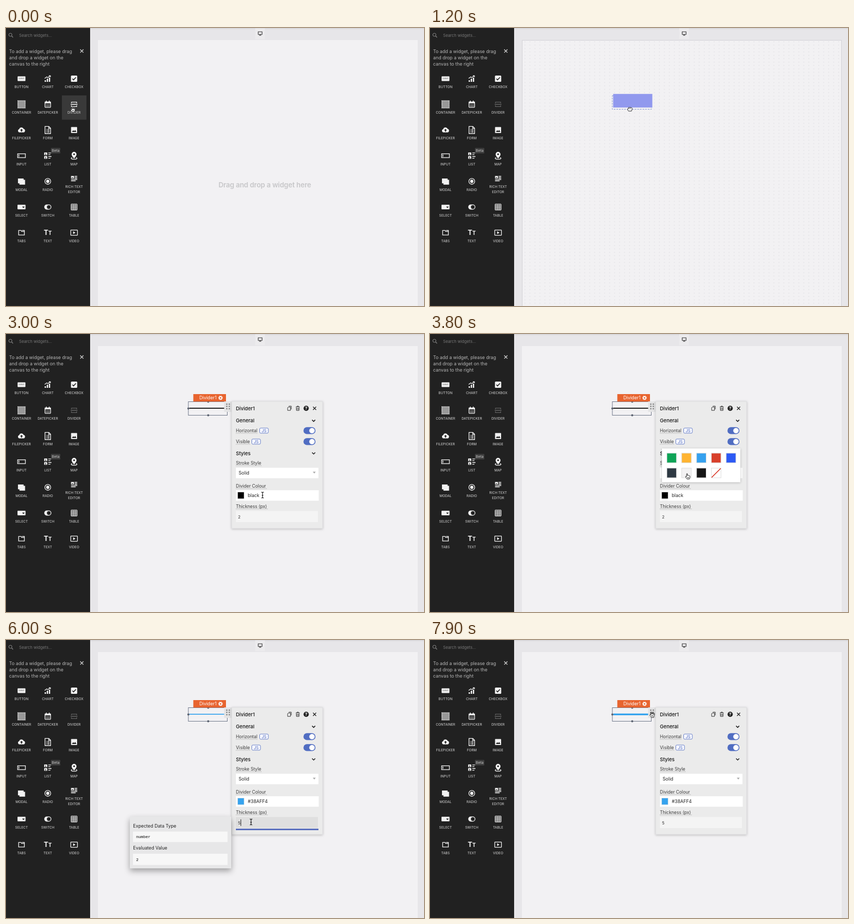
An HTML page that plays this animation: 800 px wide and 532 px high, repeating every 8 s.

```html
<!DOCTYPE html>
<html lang="en">
<head>
<meta charset="utf-8">
<title>Divider widget</title>
<style>
html, body { margin: 0; width: 100%; height: 100%; overflow: hidden; background: #e7e6e9; }
svg { display: block; width: 800px; height: 532px; font-family: Inter, "Liberation Sans", sans-serif; }
.mono { font-family: "Liberation Mono", monospace; font-size: 7.6px; }
.icon { fill: #f2f2f2; stroke: none; }
.icon .o { fill: none; stroke: #f2f2f2; stroke-width: 1.3; }
.icon .d { fill: #212121; }
.icon .c { fill: none; stroke: #212121; stroke-width: 1.6; }
.cap { font-size: 6.3px; letter-spacing: .08px; fill: #dcdcdc; text-anchor: middle; }
.head { font-size: 9.5px; font-weight: 500; fill: #111; }
.label { font-size: 8.5px; fill: #3a3a3a; }
.value { font-size: 8.7px; fill: #222; }
.line { fill: none; stroke: #222; }
</style>
</head>
<body>
<svg id="stage" viewBox="0 0 800 532"></svg>
<script>
const LOOP = 8000, STEP = 100;
const rect = (x, y, w, h, attrs = '') => `<rect x="${x}" y="${y}" width="${w}" height="${h}" ${attrs}/>`;
const path = (d, attrs = '') => `<path d="${d}" ${attrs}/>`;
const dot = (x, y, r, attrs = '') => `<circle cx="${x}" cy="${y}" r="${r}" ${attrs}/>`;
const text = (x, y, s, attrs = '') => `<text x="${x}" y="${y}" ${attrs}>${s}</text>`;
const group = (id, body, attrs = '') => `<g id="${id}" ${attrs}>${body}</g>`;
const at = (x, y, body, attrs = '') => `<g transform="translate(${x} ${y})" ${attrs}>${body}</g>`;
const O = 'class="o"', D = 'class="d"', C = 'class="c"';

// Icons are drawn around their own centre.
const icons = {
  BUTTON: rect(-7.5, -4.5, 15, 9, 'rx="1"') + text(0, 1.1, 'SUBMIT', 'font-size="3" text-anchor="middle" fill="#555"'),
  CHART: path('M-6 6V3h2.5v3zM-2 6V0h2.5v6zM2 6V-2h2.5v8z') + path('M-6-.5-2-3.5 0-2 4.5-5.5M2-5.7H5V-3', O),
  CHECKBOX: rect(-6, -6, 12, 12, 'rx="1.5"') + path('M-3.2 0-1 2.4 3.5-2.5', C),
  CONTAINER: rect(-7, -7, 14, 14, 'fill="#989898"') + rect(-7, -7, 14, 14, `${O} stroke-dasharray="1.5 .8"`),
  DATEPICKER: rect(-5.4, -4.8, 10.8, 10.6, `${O} rx=".8"`) + path('M-5.4-5H5.4V-1.8H-5.4zM-3.5-7h1.5v3h-1.5zM2-7h1.5v3H2z') +
    path('M-3.3 1H3.5M-3.3 3.5H3.5', `${O} stroke-dasharray="1.5 1.1"`),
  DIVIDER: path('M-6.5-.8h13v1.6h-13z') + path('M-5-2V-4.2H5V-2M-5 2V4.2H5V2', O),
  FILEPICKER: path('M-3.8 4.6a3.2 3.2 0 0 1-.5-6.3a4.4 4.4 0 0 1 8.3-.4a3.4 3.4 0 0 1-.2 6.7z') + path('M0-2.2 2.7.8H1V3H-1V.8h-1.7z', D),
  FORM: path('M-5.4-6.8H2L5.4-3.4V6.8H-5.4zM1.7-6.8V-3H5.4', O) + path('M-3-1h1.2M-.8-1H3.2M-3 1.5h1.2M-.8 1.5H3.2M-3 4h1.2M-.8 4H3.2', O),
  IMAGE: rect(-5.8, -5.6, 11.6, 11.4, 'rx=".8"') + path('M-4.2 3.8-1.6.2.2 2.2 2-.2 4.4 3.8z', D),
  INPUT: rect(-7.4, -3.6, 14.8, 7.4, O) + path('M-5-2V2.2', `${O} stroke-width="1"`),
  LIST: rect(-7, -6, 6, 5) + rect(-7, 1, 6, 5) + path('M1-5.2H7M1-2H5M1 1.7H7M1 5H5', O) + path('M-6-2-4.4-4-2-2zM-6 5-4.4 3-2 5z', D),
  MAP: path('M-3.5 3.5C-7 4.4-6 6.8 0 6.8S7 4.4 3.5 3.5', O) + path('M0 5.4C-3 1.5-4.7-.3-4.7-2.6a4.7 4.7 0 0 1 9.4 0C4.7-.3 3 1.5 0 5.4z') + dot(0, -2.7, 1.7, D),
  MODAL: path('M-6.8-5.5H4V-2.8H6.8V6.3H-4V3.8H-6.8z') ,
  RADIO: dot(0, 0, 5.6, O) + dot(0, 0, 3.1),
  'RICH TEXT': rect(-5.8, -4.8, 5.6, 5) + path('M1-4.2H6M1-2H6M1 .2H6M-5.8 2.3H6M-5.8 4.6H3', `${O} stroke-width="1.1"`) + path('M-5-.8-3.4-2.7-1-.8z', D),
  SELECT: rect(-7.7, -4.2, 15.4, 8.6, 'rx=".8"') + path('M2-.8 3.7.9 5.4-.8', `${C} stroke-width="1"`),
  SWITCH: rect(-6.8, -4.7, 13.6, 9.6, 'rx="4.8"') + dot(1.9, .1, 3.6, D),
  TABLE: rect(-5.5, -5.3, 11, 10.8, `${O} rx=".6"`) + path('M-5.5-1.8H5.5M-5.5 1.9H5.5M-1.8-5V5.5M1.9-5V5.5', O),
  TABS: path('M-5.5-4.2H-.8L.3-2.2H5.5V4.5H-5.5zM1-4.2H5.5V-2', `${O} stroke-width="1"`),
  TEXT: text(0, 4.8, 'T<tspan font-size="10">T</tspan>', 'font-size="13" font-weight="700" text-anchor="middle"'),
  VIDEO: rect(-6.4, -4.9, 12.8, 10, `${O} rx=".7" stroke-width="1.6"`) + path('M-1.8-2.5 2.6.1-1.8 2.7z')
};

function sidebar() {
  const tiles = Object.entries(icons).map(([name, art], i) => {
    const x = 29.7 + 50.3 * (i % 3), y = 97 + 49.1 * Math.floor(i / 3), rich = name === 'RICH TEXT';
    return at(x, rich ? y - 5.5 : y, art, `class="icon" ${name === 'DIVIDER' ? 'id="tile"' : ''}`) +
      (rich ? text(x, 306.3, name, 'class="cap"') + text(x, 316.3, 'EDITOR', 'class="cap"')
            : text(x, y + 18.2, name, 'class="cap"'));
  }).join('');
  const lines = ['To add a widget, please drag', 'and drop a widget on the', 'canvas to the right'];
  return rect(0, 0, 161, 532, 'fill="#212121"') +
    dot(8.4, 13, 3, 'fill="none" stroke="#8a8a8a"') + path('M10.6 15.2 13.4 18', 'stroke="#8a8a8a" stroke-width="1.2"') +
    text(25, 17, 'Search widgets...', 'font-size="7.7" fill="#777"') +
    lines.map((s, i) => text(6, 47.6 + 12 * i, s, 'font-size="8.8" fill="#b6b6b6"')).join('') +
    path('M142 41l6.2 6.2M148.2 41 142 47.2', 'stroke="#ddd" stroke-width="1.2"') +
    rect(107, 129, 47, 46.5, 'id="hover" fill="#393939"') + tiles +
    rect(86, 229.5, 18, 10.5, 'rx="1" fill="#3e3e3e"') + text(95, 237.3, 'Beta', 'font-size="6.8" fill="#ccc" text-anchor="middle"');
}

function widget() {
  return rect(349, 129.5, 74.5, 26, 'fill="none" stroke="#6f7789"') +
    rect(351, 141, 70, 2, 'id="rule"') +
    [[387, 129.5], [349, 142.5], [387, 155.5]].map(p => dot(...p, 2, 'fill="#59606e"')).join('') +
    rect(358.5, 115, 62.5, 14.3, 'fill="#e8642f"') + text(370, 125.3, 'Divider1', 'font-size="8.8" fill="#fff"') +
    dot(410.6, 122.2, 2.4, 'fill="none" stroke="#fff" stroke-width="1.7"') +
    dot(410.6, 122.2, 3.7, 'fill="none" stroke="#fff" stroke-width="1.2" stroke-dasharray="1.45 1.45"');
}

const labelled = (y, s, w) => text(440, y, s, 'class="label"') +
  path(`M440 ${y + 2.2}h${w}`, 'stroke="#888" stroke-width=".8" stroke-dasharray="1 1"');
const toggleRow = (y, s, w) => labelled(y + 3, s, w) +
  rect(440 + w + 3.5, y - 4.8, 16.5, 9.8, 'rx="2" fill="#f8f9ff" stroke="#5b74c4" stroke-width=".9"') +
  text(440 + w + 11.8, y + 2.9, 'JS', 'font-size="7.6" fill="#4460b8" text-anchor="middle"') +
  rect(569.3, y - 6.5, 23, 13.2, 'rx="6.6" fill="#506dc2"') + dot(585.6, y + .1, 5.2, 'fill="#fff"');
const chevron = y => path(`M585.8 ${y - 1.6}l3 3 3-3`, 'class="line" stroke-width="1.6"');

function panel() {
  const grip = [134.3, 138.6, 142.9].map(y => dot(422.6, y, 1.25) + dot(427.3, y, 1.25)).join('');
  return rect(417.5, 129, 16, 20, 'fill="#e4e4e5"') + `<g fill="#777">${grip}</g>` +
    rect(432, 129, 174, 243, 'fill="#ebebeb" stroke="#d4d4d6" stroke-width=".7" filter="url(#soft)"') +
    text(440, 145.6, 'Divider1', 'class="head"') +
    path('M540.2 139.8h4.2v6.4h-5.4v-5.2zM541.2 138h4.8v6.2', 'class="line" stroke-width=".9"') +
    path('M554.7 139.4h7.4M557 139v-1h2.8v1M555.5 140.5l.4 5.8h5l.4-5.8M557.3 141.3v3.6M559.5 141.3v3.6', 'class="line" stroke-width=".9"') +
    dot(574.5, 142.2, 5, 'fill="#222"') + text(574.5, 145.2, '?', 'font-size="8" font-weight="700" fill="#fff" text-anchor="middle"') +
    path('M587.6 139.2l6 6M593.6 139.2l-6 6', 'class="line" stroke-width="1.3"') +
    text(440, 169, 'General', 'class="head"') + chevron(166) +
    toggleRow(184.8, 'Horizontal', 42) + toggleRow(205.8, 'Visible', 27) +
    text(440, 231.5, 'Styles', 'class="head"') + chevron(228.3) +
    labelled(249.8, 'Stroke Style', 50) + rect(440, 256, 158, 20, 'fill="#fff"') +
    text(445.3, 269.2, 'Solid', 'class="value"') + path('M587.2 263.6h5.6l-2.8 3.4z', 'fill="#aaa"') +
    labelled(293.7, 'Divider Colour', 59) + rect(440, 299, 158.5, 20, 'fill="#fff"') +
    rect(443.3, 302.5, 12.4, 12.6, 'id="chip" stroke="#ddd" stroke-width=".6"') + text(462.8, 312, '', 'id="colour" class="value"') +
    labelled(332.5, 'Thickness (px)', 61) + rect(440, 338.8, 157, 21.2, 'id="field"') +
    rect(440, 361, 158, 3, 'id="focus" fill="#5b70be"') +
    text(444, 352.8, '', 'id="size" font-size="8" fill="#333"') + path('M0 343.2v12.6', 'id="caret" stroke="#222"') +
    group('bolt', rect(576.3, 338.5, 21.2, 21.5, 'fill="#050505"') + path('M588.6 344.3l-5.2 5.8h3.2l-1.4 4.6 5.4-6.2h-3.3z', 'fill="#fff"'));
}

function picker() {
  const colours = ['#0fa457', '#ffb432', '#36a1ee', '#d8402b', '#2d5af4', '#2e3943', '#f3f2f3', '#161616', '#fff'];
  return rect(444, 219, 150, 64.5, 'fill="#fff" filter="url(#soft)"') + colours.map((c, i) => {
    const x = 453.3 + 28.4 * (i % 5), y = 228 + 28.7 * Math.floor(i / 5);
    return rect(x, y, 18.4, 18.4, `fill="${c}" stroke="#ddd" stroke-width="1"`) +
      (i === 8 ? path(`M${x + .6} ${y + 17.8}l17.2-17.2`, 'stroke="#d8301f" stroke-width="1.6"') : '');
  }).join('');
}

const popup = () => rect(237, 338, 194, 99, 'fill="#e7e7e8" filter="url(#deep)"') +
  text(243.3, 359, 'Expected Data Type', 'class="value"') + rect(243, 366.7, 181, 20, 'fill="#f7f7f7"') +
  text(249, 379.4, 'number', 'class="mono"') +
  text(243.3, 401, 'Evaluated Value', 'class="value"') + rect(243, 409, 181, 21.5, 'fill="#f7f7f7"') +
  text(249, 422.8, '', 'id="result" class="mono"');

const ink = 'fill="#fff" stroke="#111" stroke-width=".9" stroke-linejoin="round"';
const cursors = {
  arrow: path('M0-5V4.6L2.2 2.6 3.7 6 5.4 5.3 3.9 2H6.8z', 'fill="#111" stroke="#fff" stroke-width=".7"'),
  grab: path('M-1.6 5.3C-2.5 3-4.3 1.5-4.3.2c.2-1 1.4-.6 2 .4L-3.2-3c0-1.2 1.3-1.2 1.6 0l.5 2-.1-3.3c.1-1.2 1.5-1.2 1.7 0L.7-1l.8-2.8c.4-1 1.6-.7 1.5.4L2.6-.4 3.5-2c.5-.9 1.6-.4 1.3.6L3.6 3 3 5.3zM-.5 1v2.5M1.2 1v2.5', ink),
  fist: path('M-2 4C-3 2.6-4.5 1.5-3.8 0c.4-.7 1-.5 1.6-.1C-3.2-3-1.4-3.6-.7-2.6 0-3.9 1.3-3.5 1.6-2.5c1-.8 2-.2 2.1.5 1-.2 1.4.6 1.2 1.6C4.6 1.6 4 2.6 3.6 4zM-.5-2.4V-.6M1.6-2.3V-.6', ink),
  hand: path('M-1.2 5.6C-2 3.8-4 2.2-4 .9c.1-1 1.4-.7 2.1.3V-4c.1-1.3 1.6-1.3 1.7 0v2.8c.5-.7 1.4-.5 1.7.2.6-.6 1.4-.3 1.6.4.8-.4 1.5 0 1.5.9C4.6 2.4 3.9 3.6 3.5 5.6zM0 2v2M1.7 2v2', ink),
  beam: path('M-2.4-5.4C-.8-5.4 0-5 0-4V4.4c0 1-.8 1.4-2.4 1.4M2.4-5.4C.8-5.4 0-5 0-4M0 4.4c0 1 .8 1.4 2.4 1.4M-1.3.9h2.6', 'fill="none" stroke="#111" stroke-width="1.1"'),
  resize: path('M0-5.2 2.3-2.5H.7V-.8H4.2V.8H.7V2.5H2.3L0 5.2-2.3 2.5H-.7V.8H-4.2V-.8H-.7V-2.5H-2.3z', 'fill="#111" stroke="#fff" stroke-width=".5"')
};

document.getElementById('stage').innerHTML = `<defs>
  <pattern id="dots" patternUnits="userSpaceOnUse" x="177" y="23" width="9.53" height="6.5">${dot(4.76, 3.25, .6, 'fill="#cfced3"')}</pattern>
  <linearGradient id="top" x2="0" y2="1"><stop stop-color="#d3d2d6"/><stop offset="1" stop-color="#e7e6e9"/></linearGradient>
  <filter id="soft" x="-20%" y="-20%" width="140%" height="140%"><feDropShadow dx="0" dy="1" stdDeviation="2.2" flood-opacity=".25"/></filter>
  <filter id="deep" x="-20%" y="-30%" width="140%" height="160%"><feDropShadow dx="0" dy="5" stdDeviation="6" flood-opacity=".35"/></filter></defs>` +
  rect(0, 0, 800, 532, 'fill="#e7e6e9"') + rect(161, 0, 639, 3, 'fill="url(#top)"') +
  rect(477, 1, 18.5, 20, 'fill="#ecebed"') +
  path('M482.7 7.2h7.4v5h-7.4zM484.3 14h4.2M486.4 12.2V14', 'fill="none" stroke="#333" stroke-width="1.1"') +
  rect(176, 23, 612, 520, 'fill="#f2f1f3"') + rect(177, 23, 610, 509, 'id="grid" fill="url(#dots)"') +
  rect(176.5, 23.5, 611, 520, 'id="edge" fill="none" stroke="#d3d2d8"') +
  text(495.3, 305.3, 'Drag and drop a widget here', 'id="hint" font-size="13.2" font-weight="600" letter-spacing="-.1" fill="#c6c6c8" text-anchor="middle"') +
  sidebar() +
  rect(0, 0, 75, 26, 'id="slot" fill="none" stroke="#8296cf" stroke-dasharray="3 2"') +
  rect(0, 0, 75, 26, 'id="ghost" fill="#9199ee"') +
  group('widget', widget()) + group('panel', panel()) + group('picker', picker()) + group('popup', popup()) +
  group('cursor', Object.entries(cursors).map(([k, v]) => group(k, v)).join(''));

const el = id => document.getElementById(id);
const set = (id, attrs) => { for (const k in attrs) el(id).setAttribute(k, attrs[k]); };
const show = (id, on) => set(id, { display: on ? 'inline' : 'none' });

// time, x, y, cursor shape from that time on
const track = [
  [0, 128, 156, 'grab'], [100, 129, 156, 'fist'], [300, 150, 156, 'fist'], [900, 350, 151, 'fist'],
  [1200, 382, 155, 'fist'], [1400, 383, 155, 'fist'], [1500, 384, 153, 'arrow'], [1800, 400, 154, 'arrow'],
  [2300, 453, 196, 'arrow'], [2700, 488, 290, 'arrow'], [2800, 490, 298, 'arrow'], [3000, 491, 308, 'beam'],
  [3200, 491, 311, 'beam'], [3500, 491, 310, 'beam'], [3600, 492, 298, 'hand'], [3800, 493, 272, 'hand'],
  [4200, 519, 241, 'hand'], [4400, 519, 241, 'hand'], [4500, 510, 262, 'arrow'], [4700, 482, 335, 'beam'],
  [4900, 469, 348, 'beam'], [6400, 469, 348, 'beam'], [6600, 455, 310, 'arrow'], [7000, 409, 156, 'resize'],
  [7100, 407, 152, 'resize'], [7400, 407, 152, 'resize'], [7600, 413, 147, 'grab'], [7800, 425, 143, 'grab']
];

function pointer(t) {
  const i = track.findLastIndex(k => k[0] <= t), a = track[i], b = track[i + 1] || a;
  const f = b === a ? 0 : (t - a[0]) / (b[0] - a[0]);
  return { x: a[1] + (b[1] - a[1]) * f, y: a[2] + (b[2] - a[2]) * f, shape: a[3] };
}

function render(time) {
  const t = Math.floor(time % LOOP / STEP) * STEP;
  const within = (from, to = LOOP) => t >= from && t < to;
  const p = pointer(t);
  const dragging = within(200, 1500), over = dragging && p.x > 208;
  const blue = t >= 4400, focused = within(5200, 7400), thick = t >= 6400;
  const paint = blue ? '#36a3ee' : '#000';

  show('hover', t < 200);
  set('tile', { opacity: t < 200 ? 1 : .3 });
  show('hint', t < 200);
  show('edge', dragging);
  show('grid', dragging || within(7400, 7700));
  show('ghost', over);
  show('slot', over);
  set('ghost', { x: p.x - 31.5, y: p.y - 28.8 });
  set('slot', {
    x: 177.3 + 9.53 * Math.round((p.x - 31.5 - 177.3) / 9.53),
    y: 25.5 + 6.5 * Math.round((p.y - 51) / 6.5)
  });

  show('widget', t >= 1500);
  show('panel', t >= 1600);
  show('picker', within(3500, 4400));
  show('popup', focused);
  show('bolt', within(4700, 5200));
  show('focus', focused);
  show('caret', focused);
  set('rule', { y: thick ? 140.7 : 141.2, height: thick ? 3.3 : 1.7, fill: paint });
  set('chip', { fill: paint });
  set('field', { fill: focused ? '#dfdfdf' : '#f4f4f4' });
  el('colour').textContent = blue ? '#38AFF4' : 'black';
  const typed = t < 5700 ? '2' : t < 6000 ? '' : '5';
  el('size').textContent = typed;
  set('caret', { transform: `translate(${typed ? 449.5 : 444.5} 0)` });
  el('result').textContent = thick ? '5' : '2';

  set('cursor', { transform: `translate(${p.x} ${p.y})` });
  for (const k in cursors) show(k, k === p.shape);
}

const start = performance.now();
function tick() {
  render(performance.now() - start);
  requestAnimationFrame(tick);
}
tick();
</script>
</body>
</html>
```
